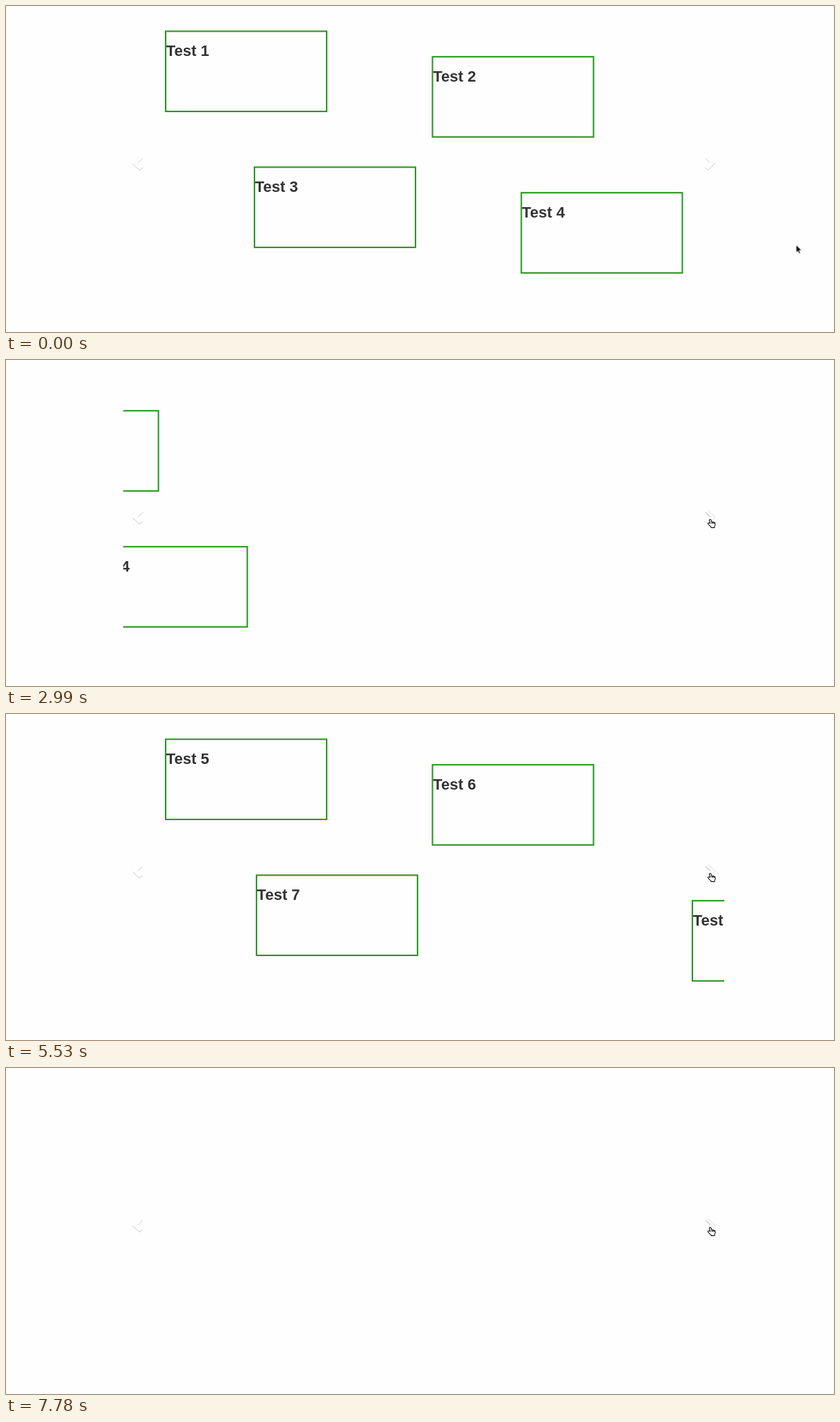
Animation, 1193 px wide and 470 px high, one loop 8000 ms. Source, as an HTML page:

```html
<!DOCTYPE html>
<html lang="en">
<head>
<meta charset="utf-8">
<title>Carousel</title>
<style>
  html, body { margin: 0; width: 100%; height: 100%; overflow: hidden; background: #fefefe; }
  svg { display: block; }
  rect.card { fill: none; stroke: #2a9722; stroke-width: 2.1; }
  text { font: bold 22px "Liberation Sans", Arial, sans-serif; fill: #333; }
  .chevron { fill: none; stroke: #c8c8c8; stroke-width: 1; }

  /* Every animation is paused; the script sets its time. */
  .slide { animation: leave .6s ease-in-out both paused; }
  #first { animation-delay: 2.61s; }
  #second { animation-delay: 7.165s; }
  #second .item {
    animation: enter 1s ease both paused;
    animation-delay: calc(3.6155s + var(--i) * .4983s);
  }
  #arrow {
    animation: nudge .29s linear .3s both paused,
               travel 1.03s ease-in-out .75s forwards paused,
               vanish .01s 2.22s both paused;
  }
  .hover { animation: wait 2.24s paused; }
  .rest { animation: vanish .01s 2.22s both paused; }

  @keyframes leave { to { transform: translateX(-866px); } }
  @keyframes enter { from { transform: translateX(866px); } }
  @keyframes nudge {
    from { transform: translate(1138.5px, 344.5px); }
    to { transform: translate(1112.5px, 331.5px); }
  }
  @keyframes travel {
    from { transform: translate(1112.5px, 331.5px); }
    to { transform: translate(1015.5px, 227.5px); }
  }
  @keyframes vanish { to { visibility: hidden; } }
  @keyframes wait { from, to { visibility: hidden; } }
</style>
</head>
<body>
<svg width="1193" height="470" viewBox="0 0 1193 470">
  <clipPath id="view"><rect x="169" width="866" height="470"/></clipPath>
  <g clip-path="url(#view)">
    <g id="first" class="slide"></g>
    <g id="second" class="slide"></g>
  </g>

  <g class="chevron">
    <path d="M197 219.5L190 226.5M182.5 227.5L192 236.5L197 233"/>
    <path class="rest" d="M1008 219.5L1014 225.5M1021.5 226.5L1012 236.5L1007.5 233"/>
    <g class="hover">
      <path stroke="#dedede" d="M1012 217L1022 226.5L1018 231M1007.5 233L1010 235"/>
      <path stroke="#a0a0a0" d="M1008 219.5L1015 226.5"/>
    </g>
  </g>

  <path id="arrow" fill="#000" stroke="#fff" stroke-width=".8"
    d="M0 0V11L2.5 8.7L4.2 12.6L6.1 11.8L4.4 8H7.8Z"/>
  <path class="hover" transform="translate(1010.5 229)" fill="#fff" stroke="#111" stroke-width="1.1" stroke-linejoin="round"
    d="M4 6.6L2.9 2Q2.8 .8 3.9 .7T5.4 1.7L6.2 4.6Q7.5 3.8 8 4.9Q9.4 4.2 9.8 5.4Q11.2 5.2 11.4 6.8Q11.6 9.4 10.4 11V12.6H5.4V11.6Q2.8 9.8 .8 7Q.7 5.4 2.3 5.9ZM6.2 4.6L6.6 7M8 4.9L8.3 7M9.8 5.4L10 7"/>
</svg>
<script>
  const LOOP = 8000, STEP = 149.58;
  const places = [[229, 35.4], [613.5, 72.2], [357, 231.4], [741.5, 268.2]];

  function fill(id, start) {
    document.getElementById(id).innerHTML = places.map(([x, y], i) => `
      <g class="item" style="--i:${i}">
        <rect class="card" x="${x + 1}" y="${y + 1}" width="232" height="115.6"/>
        <text x="${x + 1.7}" y="${y + 36.6}">Test ${start + i}</text>
      </g>`).join('');
  }
  fill('first', 1);
  fill('second', 5);

  const motions = document.getAnimations();
  const begin = performance.now();

  function draw() {
    const time = (performance.now() - begin) % LOOP;
    const shown = Math.floor((time + 5) / STEP) * STEP;
    for (const motion of motions) motion.currentTime = shown;
    requestAnimationFrame(draw);
  }
  draw();
</script>
</body>
</html>
```
